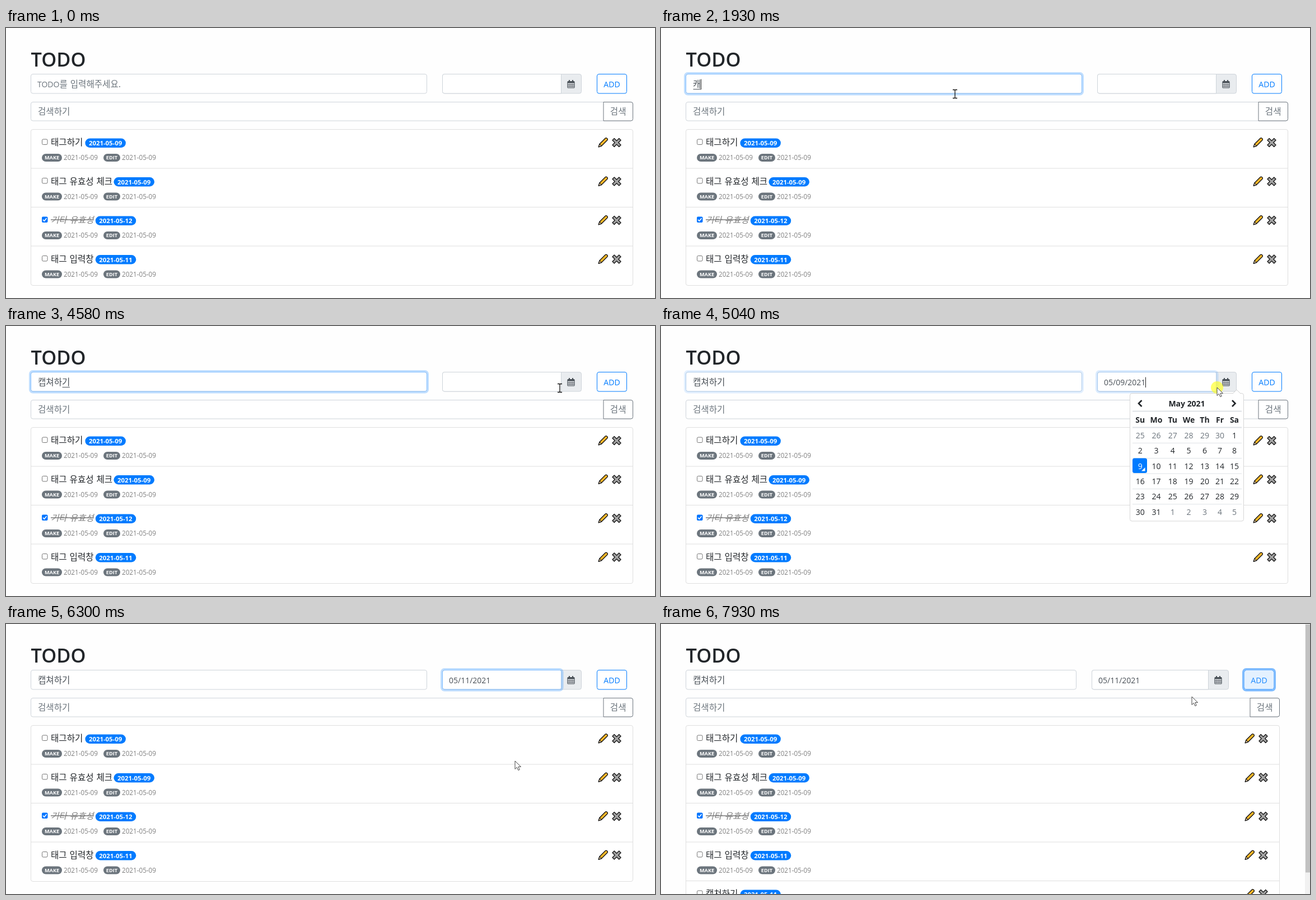
Recreate the animation shown at these times as an HTML page. Size 1159 by 483 pixels, loop 8000 ms.

```html
<!DOCTYPE html>
<html lang="ko">
<head>
<meta charset="utf-8">
<title>TODO</title>
<style>
html, body { margin: 0; width: 100%; height: 100%; overflow: hidden; background: #fefefe; }
svg { display: block; }
text { font: 14px 'Open Sans', 'Noto Sans', sans-serif; fill: #212529; white-space: pre; }
.ko { font: 15.6px 'Noto Sans CJK KR', 'Noto Sans CJK JP', sans-serif; word-spacing: .5px; }
.hint { fill: #6c757d; }
.value { fill: #495057; }
.mid { text-anchor: middle; }
.bold { font-weight: 700; }
.heading { font-size: 34.3px; font-weight: 600; }
.done { font-style: italic; text-decoration: line-through; fill: #808080; }
.due { font-size: 11.4px; font-weight: 700; fill: #fff; }
.tag { font-size: 9.2px; font-weight: 700; fill: #fff; text-anchor: middle; }
.stamp { font-size: 11.7px; fill: #808080; }
.field { fill: #fff; stroke: #ced4da; }
.addon { fill: #e9ecef; stroke: #ced4da; }
.list { fill: #fff; stroke: #dfdfdf; }
.line { stroke: #dee2e6; }
.caret { stroke: #222; }
.thin { fill: none; stroke: #495057; }
</style>
</head>
<body>
<svg id="stage" width="1159" height="483"></svg>
<script>
const BLUE = '#007bff', CHAR = 14.35, PITCH = 69.5;

const text = (x, y, s, cls = '', id = '') => `<text x="${x}" y="${y}" class="${cls}" id="${id}">${s}</text>`;
const box = (x, y, w, h, rx, attrs) => `<rect x="${x}" y="${y}" width="${w}" height="${h}" rx="${rx}" ${attrs}/>`;
const path = (d, attrs) => `<path d="${d}" ${attrs}/>`;

const pencil = (x, y) => `<g transform="translate(${x} ${y}) rotate(-45)" stroke="#111" stroke-width="1.3" stroke-linejoin="round">
  ${path('M-11 0L-6-2.5H8.5Q10.5-2.5 10.5 0T8.5 2.5H-6Z', 'fill="#fbb829"')}
  ${path('M-11 0L-6-2.5V2.5Z', 'fill="#f3d9b0" stroke-width="1"')}</g>`;

const cross = (x, y) => path('M-2.3-8.3h4.6v6h6v4.6h-6v6h-4.6v-6h-6v-4.6h6z',
  `transform="translate(${x} ${y}) rotate(45)" fill="#a3a3a3" stroke="#1a1a1a" stroke-width="1.4" stroke-linejoin="round"`);

const calendarIcon = (x, y) => `<g transform="translate(${x} ${y})" class="thin">
  ${box(-6, -5, 12, 11.5, 1, 'stroke-width="1.2"')}
  ${path('M-6-3.5H6', 'stroke-width="3"')}
  ${path('M-6 1H6M-6 3.8H6M-3-2V6M0-2V6M3-2V6', 'stroke-width=".8"')}
  ${path('M-3-7.5V-4M3-7.5V-4', 'stroke-width="2"')}</g>`;

function todoRow(i, title, due, done, shift) {
  const spaces = title.split(' ').length - 1;
  const badge = 84.5 + (title.length - spaces) * CHAR + spaces * 4;
  const check = done
    ? box(64, 198.5, 10.5, 10.5, 2, 'fill="#0075ff"') + path('M66 203.8l2.3 2.4 4.2-5', 'fill="none" stroke="#fff" stroke-width="1.6"')
    : box(64.5, 199, 9.5, 9.5, 2, 'fill="#fff" stroke="#767676"');
  const meta = (x, w, label) => box(x, 225, w, 14, 7, 'fill="#6c757d"')
    + text(x + w / 2, 235.4, label, 'tag') + text(x + w + 3, 236, '2021-05-09', 'stamp');
  return `<g transform="translate(0 ${i * PITCH})">
    ${i ? path(`M45 181.5H${1119 - shift}`, 'stroke="#dfdfdf"') : ''}
    ${check}${text(80, 210, title, 'ko' + (done ? ' done' : ''))}
    ${box(badge - .5, 197.5, 72.5, 16.5, 8.2, `fill="${BLUE}"`)}${text(badge + 6, 210, due, 'due')}
    ${meta(64, 36, 'MAKE')}${meta(174, 30, 'EDIT')}
    ${pencil(1066 - shift, 205)}${cross(1090.5 - shift, 205)}</g>`;
}

// The page narrows by 15px once the scrollbar appears.
function page(id, narrow) {
  const shift = narrow ? 15 : 0, right = 1119.5 - shift;
  const [in1, in2, in2End, addEnd] = narrow ? [741.5, 769.5, 977.5, 1013.5] : [751.5, 779.5, 991.5, 1027.5];
  const rows = [['태그하기', '2021-05-09'], ['태그 유효성 체크', '2021-05-09'],
    ['기타 유효성', '2021-05-12', true], ['태그 입력창', '2021-05-11']];
  if (narrow) rows.push(['캡쳐하기', '2021-05-11']);
  return `<g id="${id}">
    ${box(44.5, 82.5, in1 - 44.5, 34.5, 3.5, 'class="field"')}
    ${box(in2, 82.5, addEnd - in2, 34.5, 3.5, 'class="addon"')}
    ${path(`M${in2End} 82.5H${in2 + 3.5}q-3.5 0-3.5 3.5V113.5q0 3.5 3.5 3.5H${in2End}Z`, 'class="field"')}
    ${calendarIcon((in2End + addEnd) / 2 - .5, 100.5)}
    ${box(44.5, 132.5, right - 44.5, 33.5, 3.5, 'class="field"')}
    ${path(`M${right - 52.5} 132.5H${right - 3.5}q3.5 0 3.5 3.5V162.5q0 3.5-3.5 3.5H${right - 52.5}Z`, 'fill="#fff" stroke="#6c757d"')}
    ${text(57, 155, '검색하기', 'ko hint')}${text(right - 26.3, 155, '검색', 'ko hint mid')}
    ${box(44.5, 181.5, right - 44.5, rows.length * PITCH + 1, 3.5, 'class="list"')}
    ${rows.map(([title, due, done], i) => todoRow(i, title, due, done, shift)).join('')}
    ${narrow ? box(1150, 0, 9, 483, 0, 'fill="#f1f1f1"') + box(1151, 1, 8, 443.5, 0, 'fill="#c1c1c1"') : ''}</g>`;
}

const COLS = [842, 869.5, 899.5, 928, 957, 985, 1011, 1037];
const WEEK = 27.35, FIRST = 183;
const colMid = c => (COLS[c] + COLS[c + 1]) / 2;

function picker() {
  let out = box(837.5, 120.5, 203, 228.5, 3.5, 'fill="#fff" stroke="#d6d6d6"')
    + path('M1021 121L1028 114 1035 121', 'fill="#fff" stroke="#d0d0d0"')
    + path('M858.5 133l-5.5 5.5 5.5 5.5M1020 133l5.5 5.5-5.5 5.5', 'fill="none" stroke="#212529" stroke-width="2.6"')
    + text(939, 144, 'May 2021', 'bold mid')
    + path('M842 152.5H1037M842 181.5H1037', 'class="line" stroke-width="1.8"')
    + box(0, FIRST, 0, 26, 4, 'id="hover" fill="#e9ecef"');
  ['Su', 'Mo', 'Tu', 'We', 'Th', 'Fr', 'Sa'].forEach((d, c) => out += text(colMid(c), 173, d, 'bold mid'));
  for (let r = 1; r < 6; r++) out += path(`M842 ${182 + WEEK * r}H1037`, 'class="line"');
  out += box(842, 236.5, 26, 26.5, 3.5, `fill="${BLUE}"`) + path('M864.5 253v6.5H858Z', 'fill="#fff"');
  for (let i = 0; i < 42; i++) {
    const day = i < 6 ? 25 + i : (i - 6) % 31 + 1, muted = i < 6 || i > 36;
    const mark = i === 14 ? '<tspan fill="#fff">9</tspan>' : day;
    out += text(colMid(i % 7), 201 + WEEK * Math.floor(i / 7), mark, 'mid' + (muted ? ' hint' : ''));
  }
  return `<g id="picker">${out}</g>`;
}

const ring = (id, x, w, glow) => `<g id="${id}" fill="none">
  ${box(x - 2, 80.5, w + 4, 38.5, 5.5, `stroke="${BLUE}" stroke-opacity="${glow}" stroke-width="3"`)}
  ${box(x, 82.5, w, 34.5, 3.5, 'stroke="#80bdff"')}</g>`;

document.getElementById('stage').innerHTML = `
  ${page('wide', false)}${page('narrow', true)}
  ${text(44.5, 69, 'TODO', 'heading')}
  ${ring('focusTodo', 44.5, 707, .25)}${ring('focusDate', 779.5, 212.5, .25)}
  <text x="56" y="106" class="hint" id="hint">TODO<tspan class="ko">를 입력해주세요.</tspan></text>
  ${text(57, 106, '', 'ko value', 'typed')}
  <path id="underline" class="thin"/>
  ${text(791, 106, '', 'value', 'date')}
  <path id="caret" class="caret"/>
  <g id="add">
    ${box(1055.5, 82.5, 53, 34.5, 3.5, `fill="#fff" stroke="${BLUE}"`)}
    ${box(1055.5, 82.5, 53, 34.5, 3.5, `id="addFill" fill="${BLUE}"`)}
    ${ring('focusAdd', 1055.5, 53, .5)}
    ${text(1082, 106, 'ADD', 'mid', 'addLabel')}
  </g>
  ${picker()}
  <g id="pointer">
    <circle id="click" r="11" fill="#ffff28" opacity=".68"/>
    ${path('M0 0V14.5L3.4 11.3 5.8 16.6 8.2 15.6 5.9 10.4H10.5Z', 'id="arrow" fill="#fff" stroke="#333" stroke-width=".9"')}
    ${path('M-4-7.5h3q1 0 1 1 0-1 1-1h3M0-6.5V6.5M-4 7.5h3q1 0 1-1 0 1 1 1h3', 'id="beam" fill="none" stroke="#111" stroke-width="1.3"')}
    ${path('M-2 8V1a1.5 1.5 0 0 1 3 0V6l6 1.5a2 2 0 0 1 1.5 2V13l-1.5 4H-1L-5 11.5a1.4 1.4 0 0 1 2-2Z', 'id="hand" fill="#fff" stroke="#222" stroke-width=".9"')}
  </g>`;

const el = id => document.getElementById(id);
const show = (id, on) => el(id).setAttribute('visibility', on ? 'visible' : 'hidden');
const set = (id, attrs) => { for (const k in attrs) el(id).setAttribute(k, attrs[k]); };
const clamp = v => Math.min(1, Math.max(0, v));
const between = (t, a, b) => t >= a && t < b;
const easeOut = p => 1 - (1 - p) ** 2;
const fade = (t, on, off = Infinity) => easeOut(clamp((t - on) / 150)) - easeOut(clamp((t - off) / 150));

const TYPING = [[0, ''], [1760, 'ㅋ'], [1930, '캐'], [2080, '캡'], [2390, '캡ㅊ'], [2470, '캡쳐'],
  [2700, '캡쳐하'], [2860, '캡쳐학'], [2930, '캡쳐하기']];
const TRAIL = [[130, 525, 270], [220, 525, 302], [400, 525, 302], [920, 525, 118], [3430, 525, 118],
  [3800, 745, 100], [4200, 981, 110], [4290, 989, 111], [4600, 989, 111], [4740, 993, 110], [5150, 993, 110],
  [5670, 909, 245], [6380, 909, 245], [6900, 1082, 103], [7740, 1082, 103], [7930, 948, 130]];
const CLICKS = [[1230, 1440], [4890, 5060], [6050, 6220], [7200, 7360]];
const FOCUS_TODO = 1335, FOCUS_DATE = 4990, PICKED = 6220, FOCUS_ADD = 7290, ADDED = 7330;

function pointerAt(t) {
  const next = TRAIL.findIndex(k => k[0] > t);
  if (next < 1) return next ? TRAIL[TRAIL.length - 1].slice(1) : TRAIL[0].slice(1);
  const [t0, x0, y0] = TRAIL[next - 1], [t1, x1, y1] = TRAIL[next];
  const p = (t - t0) / (t1 - t0);
  return [x0 + (x1 - x0) * p, y0 + (y1 - y0) * p];
}

function pointerKind(x, y, open, onDay) {
  if (onDay) return 'hand';
  if (open && x > 837 && x < 1041 && y > 120 && y < 349) return 'arrow';
  if (y > 82 && y < 119) {
    if (x < 752 || between(x, 779, 992)) return 'beam';
    if (x > 1041) return 'hand';
  }
  if (between(y, 132, 167)) return x < 1067 ? 'beam' : 'hand';
  return 'arrow';
}

function drawPointer(t, open) {
  const [x, y] = pointerAt(t);
  const col = COLS.findIndex((edge, i) => between(x, edge, COLS[i + 1])), row = Math.floor((y - FIRST) / WEEK);
  const onDay = open && col >= 0 && between(row, 0, 6);
  show('hover', onDay);
  if (onDay) set('hover', { x: COLS[col], width: COLS[col + 1] - COLS[col], y: FIRST + row * WEEK });
  set('pointer', { transform: `translate(${x} ${y})` });
  const kind = t < TRAIL[0][0] ? '' : pointerKind(x, y, open, onDay);
  for (const k of ['arrow', 'beam', 'hand']) show(k, k === kind);
  show('click', CLICKS.some(([a, b]) => between(t, a, b)));
}

function drawCaret(t, since, x) {
  show('caret', since && (t - since) % 1060 < 530);
  set('caret', { d: `M${x} 91.5V110` });
}

function render(t) {
  const narrow = t >= ADDED, open = between(t, FOCUS_DATE, PICKED);
  show('wide', !narrow);
  show('narrow', narrow);
  show('picker', open);

  const [typedAt, typed] = TYPING.filter(s => s[0] <= t).pop();
  const end = 57 + CHAR * typed.length;
  el('typed').textContent = typed;
  show('hint', !typed);
  show('underline', typed && t < FOCUS_DATE);
  set('underline', { d: `M${end - CHAR + .5} 109.5H${end - .5}` });

  el('date').textContent = t < FOCUS_DATE ? '' : t < PICKED ? '05/09/2021' : '05/11/2021';
  set('date', { x: narrow ? 781 : 791 });
  if (between(t, FOCUS_TODO, FOCUS_DATE)) drawCaret(t, Math.max(FOCUS_TODO, typedAt), Math.round(end) + .5);
  else drawCaret(t, between(t, FOCUS_DATE, 5520) && FOCUS_DATE, 865.5);

  set('focusTodo', { opacity: fade(t, FOCUS_TODO, FOCUS_DATE) });
  set('focusDate', { opacity: narrow ? 0 : fade(t, FOCUS_DATE, FOCUS_ADD) });
  set('focusAdd', { opacity: fade(t, FOCUS_ADD) });

  const hover = fade(t, 6860, 7830);
  set('add', { transform: `translate(${narrow ? -14 : 0} 0)` });
  set('addFill', { opacity: hover });
  el('addLabel').style.fill = `rgb(${255 * hover}, ${123 + 132 * hover}, 255)`;

  drawPointer(t, open);
}

const start = performance.now();
function tick() {
  render((performance.now() - start) % 8000);
  requestAnimationFrame(tick);
}
tick();
</script>
</body>
</html>
```
